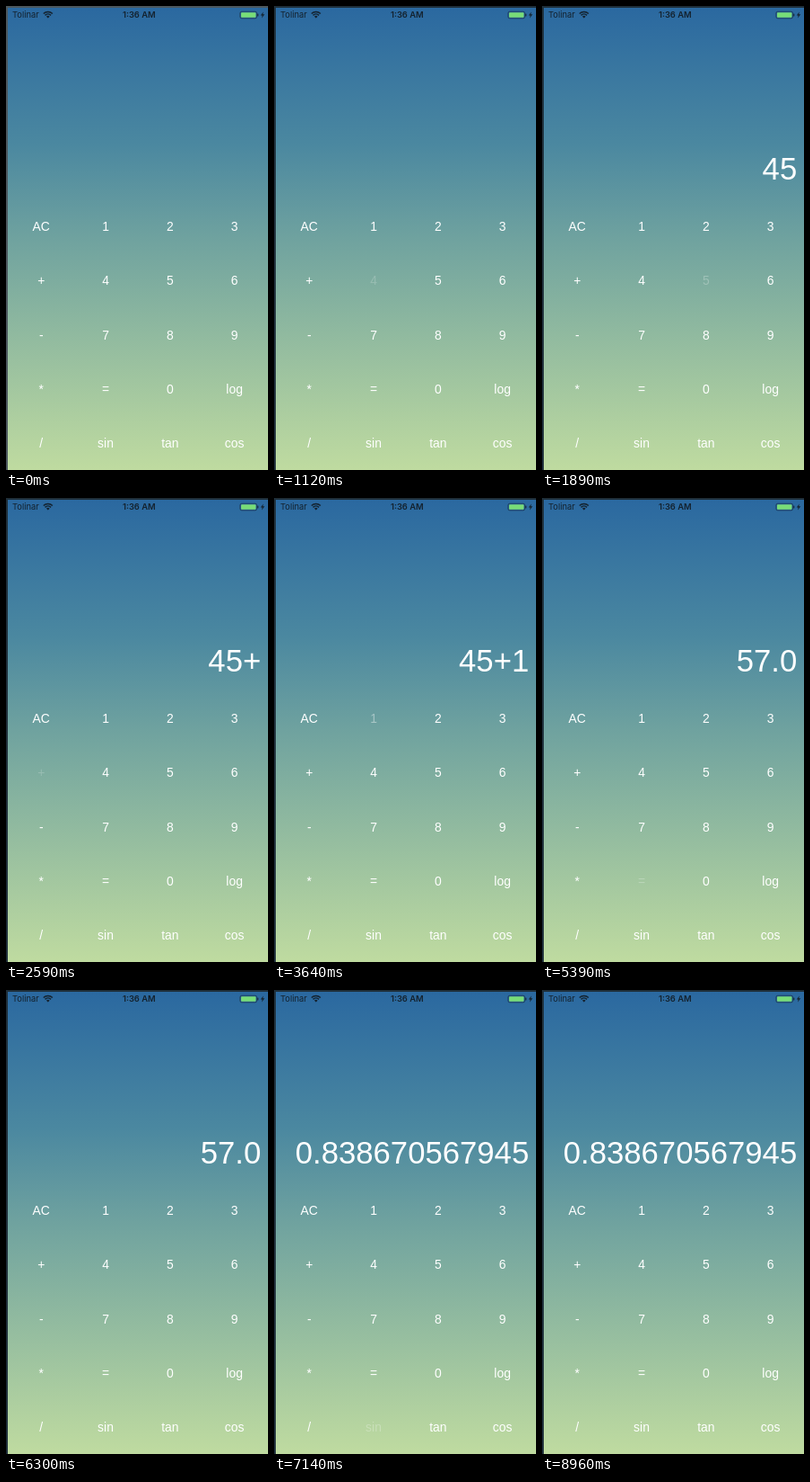
An HTML page with a canvas for the animation above (9.03 s loop, 292 by 516 pixels).

```html
<!DOCTYPE html>
<html lang="en">
<head>
<meta charset="utf-8">
<title>Calculator</title>
<style>
  html, body { margin: 0; width: 100%; height: 100%; overflow: hidden; background: #1f2f3a; }
  canvas { display: block; width: 292px; height: 516px; }
</style>
</head>
<body>
<canvas id="stage"></canvas>
<script>
const W = 292, H = 516, LOOP = 9030, STEP = 70;
const EDGE = 2, FADE = 420, PRESSED = 0.2;
const GRID = { x: 39.2, y: 250, dx: 71.8, dy: 60.25 };
const KEY_FONT = '13.9px "Liberation Sans", Arial, sans-serif';
const DISPLAY_FONT = '34.7px "Liberation Sans", Arial, sans-serif';
const STATUS_FONT = '9.4px Inter, "Liberation Sans", sans-serif';
const INK = '#14222e';

const rows = [
  ['AC', '1', '2', '3'],
  ['+', '4', '5', '6'],
  ['-', '7', '8', '9'],
  ['*', '=', '0', 'log'],
  ['/', 'sin', 'tan', 'cos']
];

// The display changes when the finger lifts.
const taps = [
  { key: '4', down: 980, up: 1190 },
  { key: '5', down: 1610, up: 1820 },
  { key: '+', down: 2380, up: 2590 },
  { key: '1', down: 3430, up: 3500 },
  { key: '2', down: 3990, up: 4200 },
  { key: '=', down: 5250, up: 5320 },
  { key: 'sin', down: 6860, up: 7070 }
];

const canvas = document.getElementById('stage');
const ctx = canvas.getContext('2d');
const ratio = window.devicePixelRatio || 1;
canvas.width = W * ratio;
canvas.height = H * ratio;

const sky = ctx.createLinearGradient(0, 0, 0, H);
sky.addColorStop(0, '#2a68a0');
sky.addColorStop(0.3, '#4b88a0');
sky.addColorStop(0.5, '#6fa29f');
sky.addColorStop(1, '#bfdba0');

function label(text, x, y, font, color, align) {
  ctx.font = font;
  ctx.fillStyle = color;
  ctx.textAlign = align;
  ctx.fillText(text, x, y);
}

function displayText(t) {
  let text = '';
  for (const { key, up } of taps) {
    if (t < up) break;
    if (key === '=') {
      const sum = text.split('+').reduce((a, b) => a + Number(b), 0);
      text = sum.toFixed(1);
    } else if (key === 'sin') {
      text = Math.sin(Number(text) * Math.PI / 180).toFixed(12);
    } else {
      text += key;
    }
  }
  return text;
}

function keyAlpha(key, t) {
  const tap = taps.find(p => p.key === key && t >= p.down);
  if (!tap) return 1;
  const p = Math.min(1, Math.max(0, (t - tap.up) / FADE));
  return PRESSED + (1 - PRESSED) * p * p * (3 - 2 * p);
}

function drawWifi(x, y) {
  ctx.strokeStyle = ctx.fillStyle = INK;
  ctx.lineWidth = 1.5;
  for (const r of [7.1, 4.6]) {
    ctx.beginPath();
    ctx.arc(x, y, r, -Math.PI * 0.75, -Math.PI * 0.25);
    ctx.stroke();
  }
  ctx.beginPath();
  ctx.moveTo(x, y);
  ctx.arc(x, y, 2.6, -Math.PI * 0.75, -Math.PI * 0.25);
  ctx.fill();
}

function drawBattery() {
  ctx.strokeStyle = 'rgba(20,34,46,0.7)';
  ctx.lineWidth = 0.8;
  ctx.beginPath();
  ctx.roundRect(260.9, 6.2, 18.6, 7.6, 1.8);
  ctx.stroke();
  ctx.fillStyle = '#78dc78';
  ctx.beginPath();
  ctx.roundRect(262, 7.3, 16.4, 5.4, 0.9);
  ctx.fill();
  ctx.fillStyle = INK;
  ctx.fillRect(280.3, 8.6, 1, 2.8);
  ctx.beginPath();
  ctx.moveTo(286.8, 6.4);
  ctx.lineTo(283.8, 10.5);
  ctx.lineTo(285.7, 10.5);
  ctx.lineTo(285, 13.6);
  ctx.lineTo(288.2, 9.3);
  ctx.lineTo(286.2, 9.3);
  ctx.closePath();
  ctx.fill();
}

function draw(t) {
  ctx.setTransform(ratio, 0, 0, ratio, 0, 0);
  const lift = Math.max(0, 1 - t / 210);
  const mix = (a, b) => Math.round(a + (b - a) * lift);
  ctx.fillStyle = `rgb(${mix(31, 76)},${mix(47, 88)},${mix(58, 94)})`;
  ctx.fillRect(0, 0, W, H);
  ctx.fillStyle = sky;
  ctx.fillRect(EDGE, EDGE, W - EDGE, H - EDGE);

  label('Tolinar', 7, 13.4, STATUS_FONT, INK, 'left');
  label('1:36 AM', 148.3, 13.4, '600 ' + STATUS_FONT, INK, 'center');
  drawWifi(46.8, 13.6);
  drawBattery();

  label(displayText(t), 284.2, 193, DISPLAY_FONT, '#fff', 'right');

  rows.forEach((row, r) => row.forEach((key, c) => {
    ctx.globalAlpha = keyAlpha(key, t);
    label(key, GRID.x + c * GRID.dx, GRID.y + r * GRID.dy, KEY_FONT, '#fff', 'center');
  }));
  ctx.globalAlpha = 1;
}

const start = performance.now();
function frame() {
  const t = (performance.now() - start) % LOOP;
  draw(Math.floor(t / STEP) * STEP);
  requestAnimationFrame(frame);
}
frame();
</script>
</body>
</html>
```
